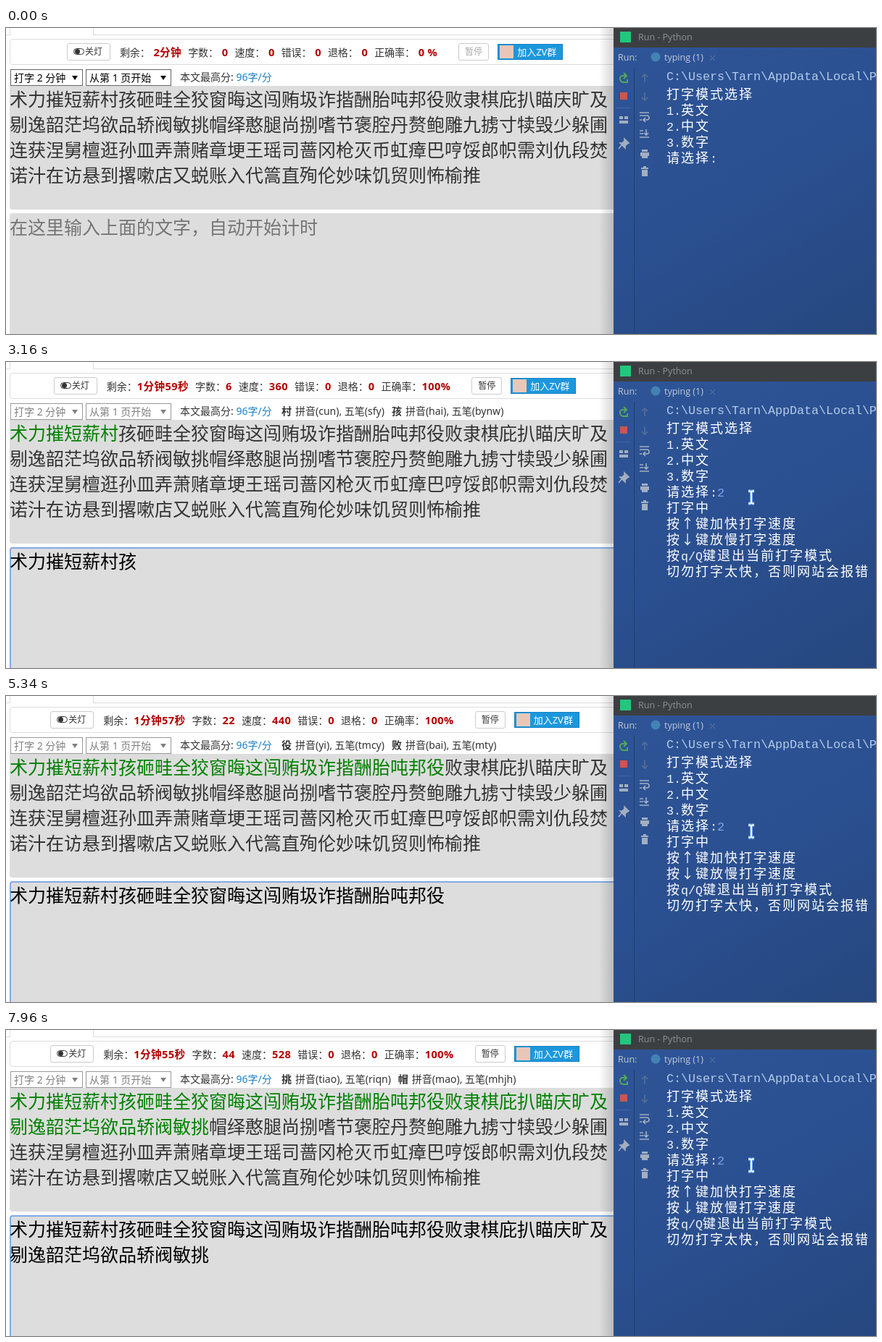
These frames come from a looping animation (1200x423 px, 8000 ms). An HTML page:

```html
<!DOCTYPE html>
<html lang="zh-CN">
<head>
<meta charset="utf-8">
<title>Typing test</title>
<style>
html, body { margin: 0; width: 100%; height: 100%; overflow: hidden; background: #fff; }
#stage { position: relative; width: 1200px; height: 423px; overflow: hidden; background: #fff;
  font: 14px/20px "Noto Sans", "Noto Sans CJK SC", "Noto Sans CJK", sans-serif; color: #333; white-space: pre; }
#stage div, #stage svg { position: absolute; box-sizing: border-box; }
#stage svg { left: 0; top: 0; }

/* web page */
.tab { border: solid #ddd; }
#bar { left: 5px; top: 15px; width: 860px; height: 36px; border: 1px solid #ddd; border-radius: 4px; }
#stats { left: 0; top: 21px; width: 852px; height: 24px; display: flex; justify-content: center; align-items: center; }
.btn { box-sizing: border-box; height: 24px; border: 1px solid #ccc; border-radius: 3px; font-size: 12px; line-height: 22px; text-align: center; }
#lamp { width: 60px; margin-right: 13px; padding-left: 24px; text-align: left; position: relative; }
#lamp i { position: absolute; left: 8px; top: 6px; width: 15px; height: 9px; box-sizing: border-box; border: 1px solid #333; border-radius: 5px; }
#lamp i::after { content: ""; position: absolute; left: 1px; top: 0; width: 7px; height: 7px; border-radius: 50%; background: #333; }
.stat { margin-right: 9px; }
.stat b { color: #b30000; font-size: 14.6px; letter-spacing: .4px; }
.idle .stat b { margin-left: 4.5px; }
#pause { width: 42px; margin: 0 12px 0 20px; }
.idle #pause { color: #aaa; }
#join { box-sizing: border-box; width: 90px; height: 22px; background: #1c97dc; border: 1px solid #1580c4; color: #fff; font-size: 13px; line-height: 20px; padding-left: 26px; position: relative; }
#join i { position: absolute; left: 2px; top: 1px; width: 19px; height: 18px; background: #e9c7b8; }
.select { top: 57px; height: 23px; border: 1px solid #999; background: #fff; color: #808080; padding-left: 4px; line-height: 21px; }
.idle .select { color: #000; border-color: #666; }
.select::after { content: ""; position: absolute; right: 6px; top: 8px; border: solid transparent; border-width: 6px 4px 0; border-top-color: currentColor; }
#best { left: 240px; top: 58px; }
#best span { color: #2180c3; }
#hint { left: 380px; top: 58px; }
#hint b { margin-right: 5px; }
#hint span { margin-right: 10px; }
.pane { left: 5px; width: 860px; background: #ddd; }
.big { left: 5px; font-size: 25px; line-height: 35px; }
#done { color: #008000; }
#mark { width: 26px; height: 3px; background: #e8141e; }
#caret { width: 1px; height: 33px; background: #000; }
#input { top: 256px; height: 180px; border-radius: 4px; border: 2px solid #ddd; }
#input.focus { border-color: #82aae6; }
#shade { left: 818px; top: 0; width: 20px; height: 423px; background: linear-gradient(90deg, transparent, rgba(0,0,0,.16)); }

/* run window */
#ide { left: 838px; top: 0; width: 362px; height: 423px; background: linear-gradient(150deg, #2e5598, #2b5091 50%, #26477f); overflow: hidden; }
#title { left: 0; top: 0; width: 362px; height: 27px; background: #3c3f41; }
.ui { font: 12.5px/18px "Open Sans", "Noto Sans", sans-serif; color: #c3cad6; }
#console { left: 73px; top: 57px; font: 16.66px/22px "Liberation Mono", monospace; color: #eef3fb; }
#console p { margin: 0; height: 22px; }
#console .cjk { font: 500 18px/22px "Noto Sans CJK SC", "Noto Sans CJK", sans-serif; letter-spacing: 2px; color: #fff; }
#path { color: #b4cbea; }
#answer { color: #7fa3ee; }
#cursor { width: 2px; height: 22px; background: #c3cfe2; }
</style>
</head>
<body>
<div id="stage">
  <div class="tab" style="left:5px;top:-5px;width:116px;height:15px;border-width:0 1px"></div>
  <div class="tab" style="left:120px;top:9px;width:730px;height:1px;border-width:1px 0 0"></div>
  <div class="tab" style="left:0;top:9px;width:6px;height:1px;border-width:1px 0 0"></div>
  <div id="bar"></div>
  <div id="stats">
    <span class="btn" id="lamp"><i></i>关灯</span>
    <span class="btn" id="pause">暂停</span>
    <span id="join"><i></i>加入ZV群</span>
  </div>
  <div class="select" style="left:6px;width:100px">打字 2 分钟</div>
  <div class="select" style="left:110px;width:118px">从第 1 页开始</div>
  <div id="best">本文最高分: <span>96字/分</span></div>
  <div id="hint"></div>
  <div class="pane" style="top:80px;height:171px;border-radius:0 0 4px 4px"></div>
  <div class="big" style="top:81px"><span id="done"></span><span id="rest"></span></div>
  <div id="mark"></div>
  <div class="pane" id="input"></div>
  <div class="big" id="typed" style="top:258px"></div>
  <div id="caret"></div>
  <div id="shade"></div>

  <div id="ide">
    <div id="title"></div>
    <div class="ui" style="left:34px;top:4px;color:#8f9294">Run - Python</div>
    <div class="ui" style="left:6px;top:32px">Run:</div>
    <div class="ui" style="left:70px;top:32px">typing (1)</div>
    <svg width="362" height="423" fill="none" stroke="#a3afc0" stroke-width="1.6">
      <rect x="9" y="5" width="15" height="15" fill="#21c77d" stroke="none"/>
      <circle cx="58" cy="40" r="6.5" fill="#4383b4" stroke="none"/>
      <path d="M133 38l7 7m0-7l-7 7" stroke="#667ba3" stroke-width="1"/>
      <path d="M28.500 55V423" stroke="#263d63" stroke-width="1"/>
      <path d="M4 110.500H24" stroke="#46659d" stroke-width="1"/>
      <path d="M17 66H12a4 4 0 0 0-3 5q1 4 5 4h5v-4M14 62l4 4-4 4" stroke="#54a857" stroke-width="2"/>
      <rect x="9" y="89" width="10" height="10" fill="#cf5450" stroke="none"/>
      <path d="M8 122h5v4H8zm7 0h5v4h-5zM8 128h12v4H8z" fill="#a3afc0" stroke="none"/>
      <path d="M15 153l6 6-2 1-3 3v3l-7-7h3l3-3zM11 162l-4 5" fill="#a3afc0"/>
      <path d="M43 75V64m-4 4l4-4 4 4M43 89v11m-4-4l4 4 4-4" stroke="#5a6e93"/>
      <path d="M36 117h13M36 121h10q3 0 3 3t-3 3h-4m2-3l-3 3 3 3M36 127h3"/>
      <path d="M36 142h5M36 146h5M36 151h13M45 140v8m-3-3l3 3 3-3"/>
      <path d="M39 168h8v3h-8zM37 172h12v5H37zM39 176h8v4h-8z" fill="#a3afc0" stroke="none"/>
      <path d="M38 193h10v2H38zM41 191h4v2h-4zM39 196h8v9h-8z" fill="#a3afc0" stroke="none"/>
    </svg>
    <div id="console"></div>
    <div id="cursor"></div>
  </div>
  <svg id="mouse" width="20" height="24" viewBox="-10 -12 20 24" fill="none">
    <path id="beam" d="M-4 -8.500H-1.500L0 -7.500 1.500 -8.500H4M-4 8.500H-1.500L0 7.500 1.500 8.500H4M0 -7.500V7.500" stroke="#5ba0f5" stroke-width="4"/>
    <use href="#beam"/>
    <path d="M-4 -8.500H-1.500L0 -7.500 1.500 -8.500H4M-4 8.500H-1.500L0 7.500 1.500 8.500H4M0 -7.500V7.500" stroke="#fff" stroke-width="1.8"/>
  </svg>
</div>
<script>
const $ = id => document.getElementById(id);
const LOOP = 8000, COLS = 33, CELL = 25, LINE = 35;
const ENTER = 2020, FOCUS = 2180, LAST = 44;

const text = '术力摧短薪村孩砸畦全狡窗晦这闯贿圾诈揩酬胎吨邦役败隶棋庇扒瞄庆旷及' +
  '剔逸韶茫坞欲品轿阀敏挑帽绎憨腿尚捌嗜节褒腔丹赘鲍雕九掳寸犊毁少躲圃' +
  '连获涅舅檀逛孙皿弄萧赌章埂王瑶司蔷冈枪灭币虹瘴巴哼馁郎帜需刘仇段焚' +
  '诺汁在访悬到撂嗽店又蜕账入代篙直殉伦妙味饥贸则怖榆推';

// pinyin/wubi of each character in typing order
const codes = ('shu/syi li/ltn cui/rmwy duan/tdgu xin/ausr cun/sfy hai/bynw za/damh qi/lffg quan/wgf ' +
  'jiao/quqy chuang/pwtq hui/jtxu zhe/ypi chuang/ucd hui/mdeg ji/feyy zha/ythf kai/rxxr chou/sgyh ' +
  'tai/eckg dun/kgbn bang/dtbh yi/tmcy bai/mty li/vii qi/sadw bi/yxxv ba/rwy miao/halg qing/ydi ' +
  'kuang/jyt ji/eyi ti/jqrj yi/qkqp shao/ujvk mang/aiyn wu/fqng yu/wwkw pin/kkkf jiao/lttj fa/uwae ' +
  'min/txgt tiao/riqn mao/mhjh').split(' ').map(c => c.split('/'));

const stats = ['剩余', '字数', '速度', '错误', '退格', '正确率'].map(label => {
  const item = document.createElement('span');
  item.className = 'stat';
  item.innerHTML = label + '：<b></b>';
  $('stats').insertBefore(item, $('pause'));
  return item.lastChild;
});

const cjk = s => s.replace(/[^\x00-\xff]+/g, '<span class="cjk">$&</span>');
const row = s => `<p>${cjk(s)}</p>`;
$('console').innerHTML = '<p id="path">C:\\Users\\Tarn\\AppData\\Local\\P</p>' +
  ['打字模式选择', '1.英文', '2.中文', '3.数字'].map(row).join('') +
  `<p>${cjk('请选择:')}<span id="answer">2</span></p><div id="output" style="position:static">` +
  ['打字中', '按↑键加快打字速度', '按↓键放慢打字速度', '按q/Q键退出当前打字模式', '切勿打字太快，否则网站会报错'].map(row).join('') + '</div>';

const put = (el, x, y) => { el.style.transform = `translate(${x}px,${y}px)`; };
const show = (el, on) => { el.style.visibility = on ? 'visible' : 'hidden'; };
const set = (el, s) => { if (el.textContent !== s) el.textContent = s; };
const wrap = s => s.replace(/.{33}(?=.)/g, '$&\n');

// characters entered by time t; slower at first
const typedAt = t => Math.max(0, Math.min(LAST,
  Math.floor(7 + (t - 3160) / (t < 3160 ? 140 : 127))));

const hintFor = i => `<b>${text[i]}</b><span>拼音(${codes[i][0]}), 五笔(${codes[i][1]})</span>`;
let hinted = -1;

function drawStats(t) {
  // the page refreshes its numbers four times a second
  const poll = Math.floor((t - 135) / 250) * 250 + 135;
  const count = typedAt(poll), secs = Math.max(1, Math.floor((poll - 2100) / 1000));
  const values = count
    ? [`1分钟${60 - secs}秒`, count, count * 60 / secs | 0, 0, 0, '100%']
    : ['2分钟', 0, 0, 0, 0, '0 %'];
  values.forEach((v, i) => set(stats[i], String(v)));
  $('stage').className = count ? '' : 'idle';
}

function drawText(t) {
  const n = typedAt(t), marked = typedAt(t - 18);
  const all = wrap(text), cut = marked + Math.floor(marked / COLS);
  set($('done'), all.slice(0, cut));
  set($('rest'), all.slice(cut));
  show($('mark'), marked > 0);
  put($('mark'), 5 + marked % COLS * CELL, 112 + Math.floor(marked / COLS) * LINE);

  set($('typed'), n ? wrap(text.slice(0, n)) : '在这里输入上面的文字，自动开始计时');
  $('typed').style.color = n ? '#000' : '#757575';
  const line = n > COLS ? 1 : 0;
  show($('caret'), t >= FOCUS);
  put($('caret'), 6 + (n - line * COLS) * CELL, 258 + line * LINE);
  $('input').classList.toggle('focus', t >= FOCUS);

  if (marked !== hinted) {
    hinted = marked;
    $('hint').innerHTML = marked ? hintFor(marked - 1) + hintFor(marked) : '';
  }
}

function drawConsole(t) {
  show($('answer'), t >= 1400);
  show($('output'), t >= ENTER);
  show($('cursor'), t < ENTER ? t >= 640 : t % 1000 >= 500);
  if (t < ENTER) put($('cursor'), t < 1400 ? 142 : 152, 165);
  else put($('cursor'), 73, 297);
}

function drawMouse(t) {
  const p = Math.max(0, Math.min(1, (t - 140) / 500)), e = p * p * (3 - 2 * p);
  show($('mouse'), t >= 140);
  put($('mouse'), 572 + 456 * e - 10, 423 - 236 * e - 12);
}

function frame(now) {
  const t = now % LOOP;
  drawStats(t);
  drawText(t);
  drawConsole(t);
  drawMouse(t);
  requestAnimationFrame(frame);
}
frame(0);
</script>
</body>
</html>
```
